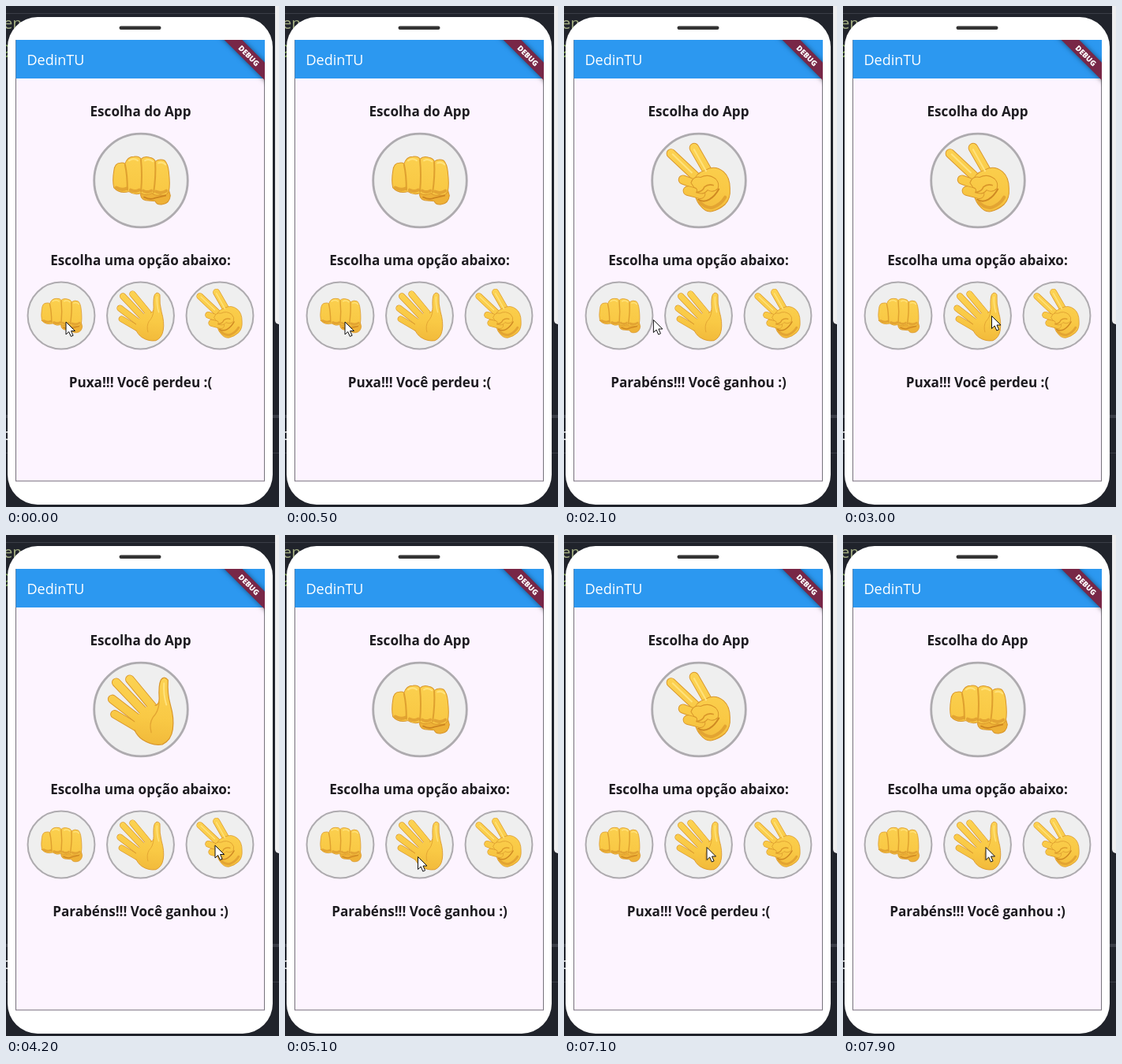
These frames come from a looping animation (346x636 px, 8000 ms). An HTML page with a canvas:

```html
<!DOCTYPE html>
<html lang="pt-BR">
<head>
<meta charset="utf-8">
<title>DedinTU</title>
<style>
  html, body { margin: 0; width: 100%; height: 100%; overflow: hidden; background: #20232b; }
  canvas { display: block; width: 346px; height: 636px; }
</style>
</head>
<body>
<canvas id="stage"></canvas>
<script>
const W = 346, H = 636, LOOP = 8000;
const canvas = document.getElementById('stage');
const ctx = canvas.getContext('2d');
const dpr = window.devicePixelRatio || 1;
canvas.width = W * dpr;
canvas.height = H * dpr;

const SANS = '"Open Sans", "Noto Sans", sans-serif';
const WIN = 'Parabéns!!! Você ganhou :)';
const LOSE = 'Puxa!!! Você perdeu :(';
const EDGE = '#d9962a', SHADE = '#e3a432', LIGHT = '#ffe27c';

const rounds = [
  { at: 0, pick: fist, text: LOSE },
  { at: 600, pick: scissors, text: WIN },
  { at: 2750, pick: scissors, text: LOSE },
  { at: 3900, pick: paper, text: WIN },
  { at: 4950, pick: fist, text: WIN },
  { at: 5900, pick: scissors, text: LOSE },
  { at: 7150, pick: fist, text: WIN }
];

// Pointer moves: start, end, target x, target y
const moves = [
  [0, 0, 75.5, 400.5],
  [1850, 2500, 188, 393],
  [3150, 3750, 264.5, 393.5],
  [4350, 4850, 168, 408],
  [5250, 5700, 180.5, 396]
];

function box(x, y, w, h, r, color) {
  ctx.beginPath();
  ctx.roundRect(x, y, w, h, r);
  ctx.fillStyle = color;
  ctx.fill();
}

function label(text, x, y, font, color, align = 'center') {
  ctx.font = font;
  ctx.textAlign = align;
  ctx.fillStyle = color;
  ctx.fillText(text, x, y);
}

function skin() {
  const g = ctx.createLinearGradient(10, -45, 0, 45);
  g.addColorStop(0, '#fcd353');
  g.addColorStop(0.6, '#f9c945');
  g.addColorStop(1, '#f1b93a');
  return g;
}

function line(d, color = EDGE, width = 1.2) {
  ctx.strokeStyle = color;
  ctx.lineWidth = width;
  ctx.stroke(new Path2D(d));
}

function shape(d, fill = skin(), edge = EDGE) {
  ctx.fillStyle = fill;
  ctx.fill(new Path2D(d));
  if (edge) line(d, edge, 1);
}

function finger(x1, y1, x2, y2, width) {
  const d = `M${x1} ${y1}L${x2} ${y2}`;
  line(d, EDGE, width);
  line(d, skin(), width - 1.8);
}

function fist() {
  shape('M0 14Q-2 23 6 25L18 26Q20 31 27 30Q36 29 37 19L34 8Z', '#eeb136');
  shape('M-34 9Q-36 0 -34 -12Q-33 -22 -26 -22Q-22 -23 -20 -21Q-17 -30 -9 -30Q-2 -31 0 -27Q4 -31 11 -29Q17 -28 18 -24Q24 -28 30 -25Q34 -21 35 -11Q37 6 35 14Q32 20 24 18Q18 20 14 16Q7 20 0 16Q-8 19 -15 14Q-27 17 -34 9Z');
  line('M-31 9Q-24 13 -18 10M-13 12Q-7 15 -2 12M3 13Q8 16 13 13M19 14Q26 17 32 13', SHADE, 4);
  line('M-20 -20Q-17 -7 -17 12M0 -26Q2 -7 0 14M18 -23Q19 -6 16 15', '#dfa02f', 2);
  line('M-15 -25Q-9 -29 -4 -25M5 -25Q10 -28 15 -24M22 -22Q27 -24 31 -20', LIGHT, 2);
  line('M4 21Q12 25 18 22L31 19', '#cd8520', 1.8);
}

function paper() {
  finger(-33, 6, -4, 23, 11);
  finger(-36, -13, -1, 14, 11.5);
  finger(-31, -34, 6, 5, 11.5);
  finger(-14, -38, 15, -3, 11.5);
  shape('M-9 21Q-7 9 2 1Q10 -8 17 -5Q23 -6 23 -14Q22 -31 25 -37Q29 -43 34 -37Q33 -20 37 -6Q42 11 40 25Q38 39 27 44Q14 46 2 38Q-6 32 -9 21Z', skin(), null);
  line('M18 -5Q23 -6 23 -14Q22 -31 25 -37Q29 -43 34 -37Q33 -20 37 -6Q42 11 40 25Q38 39 27 44Q14 46 2 38Q-4 34 -8 26');
  line('M23 -9Q22 3 15 10Q10 18 13 29', SHADE, 1.3);
  line('M29 -33Q28 -19 32 -6', LIGHT, 2);
}

function scissors() {
  finger(-35, -34, -2, -3, 12);
  finger(-6, -41, 14, -6, 12.5);
  shape('M-7 3Q-5 -9 8 -13Q20 -20 31 -11Q39 -4 39 10Q40 23 33 30Q25 37 16 39Q8 40 2 32Q-6 24 -7 3Z');
  line('M1 27Q8 35 17 34Q28 30 33 21', SHADE, 4);
  finger(-20, -1, -4, 5, 12);
  finger(-14, 13, 2, 17, 12.5);
  shape('M-10 3Q-7 -6 2 -4Q12 -9 21 -2Q26 3 24 10Q18 16 11 12Q6 19 -3 15Q-1 10 -6 9Z');
  line('M-1 24Q6 28 13 24Q20 20 25 11', '#cf8923', 2);
  line('M-3 15Q5 14 7 8Q12 4 18 6', EDGE, 1.6);
  line('M-33 -33L-9 -10M-6 -39L9 -12', LIGHT, 2);
}

function button(x, y, r, draw) {
  ctx.save();
  ctx.translate(x, y);
  ctx.scale(r / 60, r / 60);
  ctx.lineCap = ctx.lineJoin = 'round';
  ctx.beginPath();
  ctx.arc(0, 0, 58.8, 0, 7);
  ctx.fillStyle = '#efefef';
  ctx.fill();
  ctx.strokeStyle = '#aeabaf';
  ctx.lineWidth = 2.8;
  ctx.stroke();
  draw();
  ctx.restore();
}

function backdrop() {
  ctx.fillStyle = '#20232b';
  ctx.fillRect(0, 0, W, H);
  ctx.fillStyle = '#3b3e47';
  ctx.fillRect(0, 9, W, 1);
  ctx.fillRect(0, 519, W, 4);
  ctx.fillRect(0, 567, W, 1);
  const mono = '19px "Noto Sans Mono", monospace';
  label('en', -3, 29, mono, '#a0ab80', 'left');
  label('g', -6, 60, mono, '#83ad57', 'left');
  label('c', -5, 551, mono, '#e8e8e8', 'left');
  box(341, -10, 20, 414, 5, '#eeeeef');
  box(2, 14, 336, 619, 38, '#fff');
  box(143.5, 25.5, 53, 4.5, 2.2, '#333');
}

function banner() {
  ctx.save();
  ctx.beginPath();
  ctx.rect(13, 43, 315, 60);
  ctx.clip();
  ctx.translate(308, 63);
  ctx.rotate(Math.PI / 4);
  ctx.shadowColor = 'rgba(0,0,0,.5)';
  ctx.shadowBlur = 6;
  ctx.fillStyle = '#782747';
  ctx.fillRect(-50, -8, 100, 16);
  ctx.shadowColor = 'transparent';
  label('DEBUG', 0, 3.6, '800 9.5px ' + SANS, '#fff');
  ctx.restore();
}

function app(round) {
  ctx.fillStyle = '#fdf4ff';
  ctx.fillRect(12, 43, 316, 561);
  ctx.strokeStyle = '#77737b';
  ctx.lineWidth = 1;
  ctx.strokeRect(12.5, 43.5, 315, 559.5);
  ctx.fillStyle = '#2c98f0';
  ctx.fillRect(12.5, 43, 315.5, 49);
  label('DedinTU', 26.5, 75, '18px ' + SANS, '#fff', 'left');
  banner();

  const bold = '700 17.1px ' + SANS, ink = '#1d1b20';
  label('Escolha do App', 170.5, 139.5, bold, ink);
  label('Escolha uma opção abaixo:', 170.5, 328.5, bold, ink);
  label(round.text, 170.5, 483.5, bold, ink);

  button(171, 221.5, 60.5, round.pick);
  [fist, paper, scissors].forEach((hand, i) => button(70 + i * 100.5, 393, 43.3, hand));
}

function pointer(t) {
  let [, , x, y] = moves[0];
  for (const [start, end, tx, ty] of moves.slice(1)) {
    if (t < start) break;
    const k = Math.min(1, (t - start) / (end - start));
    const e = k * k * (3 - 2 * k);
    x += (tx - x) * e;
    y += (ty - y) * e;
  }
  ctx.save();
  ctx.translate(x, y);
  shape('M.5 .5V16.5L4.2 13L6.8 19L9.6 17.8L7 12H12Z', '#fff', '#111');
  ctx.restore();
}

const begin = performance.now();

function frame() {
  const t = (performance.now() - begin) % LOOP;
  ctx.setTransform(dpr, 0, 0, dpr, 0, 0);
  backdrop();
  app(rounds.filter(r => r.at <= t).pop());
  pointer(t);
  requestAnimationFrame(frame);
}
frame();
</script>
</body>
</html>
```
